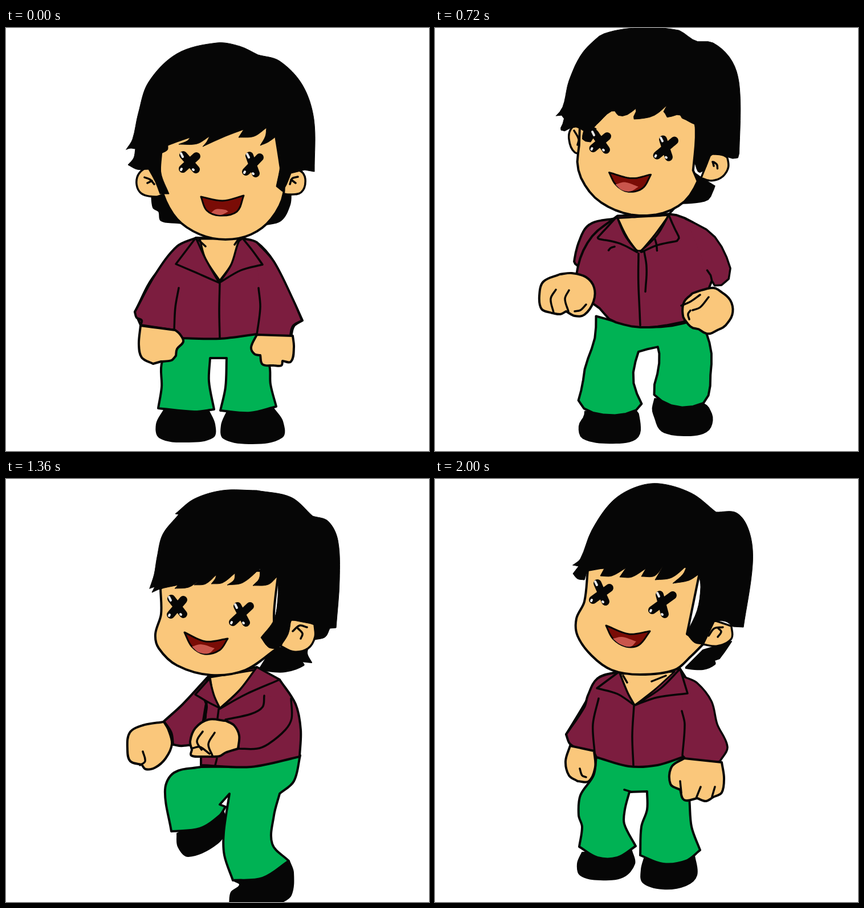
Write an HTML page that moves like this. It is 742x742 px and loops after 2080 ms.

```html
<!DOCTYPE html>
<html lang="en">
<head>
<meta charset="utf-8">
<title>Dancing boy</title>
<style>
html, body { margin: 0; width: 100%; height: 100%; overflow: hidden; background: #fff; }
svg { display: block; width: 100vw; height: 100vh; }
path { stroke: #060606; stroke-linejoin: round; stroke-linecap: round; }
</style>
</head>
<body>
<svg id="stage" viewBox="0 0 742 742"></svg>
<script>
const STEP = 80, FRAMES = 26;
const INK = '#060606', SKIN = '#fac77b', SHIRT = '#7c1d3f', GREEN = '#00b254';

// name, fill, stroke width, closed
const BODY = [
  ['shoes', INK, 2, true], ['pants', GREEN, 4, true], ['armL', SHIRT, 4, true],
  ['torso', SHIRT, 4, true], ['armR', SHIRT, 3.5, false], ['neck', SKIN, 3, true],
  ['collar', SHIRT, 3.5, true], ['creases', 'none', 3.5, false],
  ['hands', SKIN, 4, true], ['knuckles', 'none', 3.5, false]
];
const HEAD = [
  ['backHair', INK, 2, true], ['ears', SKIN, 3.5, true], ['earLines', 'none', 3.5, false],
  ['face', SKIN, 4, true], ['hair', INK, 1, true], ['eyes', 'none', 14, false],
  ['mouth', '#7a0c06', 3, true], ['tongue', '#c9554c', 0, true], ['shine', 'none', 4, false]
];
const LAYERS = [...BODY, ...HEAD];

// One line per layer. "!" marks a sharp point, "/" starts a new outline.
const front = `255,285! 500,285! 498,310 482,338 450,346! 380,350 300,342! 272,338 268,322 258,315
490,252! 485,290! 495,292 518,288 525,265 515,250/268,250! 248,244 230,262 235,288 262,296 280,290!
512,261 502,264 498,274/500,266 508,272/243,262 253,266 260,274/248,272 256,268
285,185! 272,220! 270,250 275,290 300,335 340,362 385,371 430,362 465,335 487,290 481,240 470,170!
211,213! 222,195 232,150 250,95 300,45 370,26 410,32 442,47! 480,58 520,100 540,160 541,252! 524,249! 500,255! 492,275 485,287! 474,278! 481,240 478,208 474,190! 460,200 446,206! 455,190 457,175! 435,190 408,192! 417,178! 385,190 345,208! 352,200 357,190! 335,203 303,204! 318,198 323,192! 300,200 284,206! 283,214 272,220! 272,255 286,291! 270,291! 262,270 250,248! 230,248 214,240! 224,228 227,212! 218,211
311,223 333,248/334,225 310,247/427,224 438,255/445,227 421,252
342,296! 380,303 417,294! 405,322 375,329 352,320
360,324! 368,318 385,319 390,322! 376,328`;

const side = `440,305! 460,310 505,295! 498,318 506,335! 488,333! 492,340 460,351 430,350 415,345!
470,260! 460,280 452,306! 475,316 500,310 512,290 511,268! 490,260
498,273 485,270 473,280/482,275 490,284 487,293
241,205! 242,250 232,285 238,310 270,340 330,357 390,348 443,312! 440,250 448,175! 300,170!
222,205! 230,180 235,150 245,110 273,75! 267,74! 300,48 350,33 410,33! 470,45 508,78! 535,87 552,120 555,190 549,274! 538,275! 530,290 512,295! 511,268! 490,264 470,260! 465,285 452,306! 442,311! 430,308 417,291! 440,260 447,220 447,183! 430,198 403,200! 414,188 416,170! 385,195 358,199! 370,190 372,178! 350,195 330,197! 337,188 339,181! 320,197 300,199! 308,192! 290,203 266,205! 272,199! 240,206 226,212! 231,202!
260,223 281,250/281,225 259,251/376,236 391,265/398,236 368,264
283,282! 320,298 359,293! 345,313 318,320 296,307
296,307! 312,303 336,310! 325,319 308,317`;

const sideLow = `440,275! 460,270 500,262! 494,280 495,296! 485,298! 486,310 460,323 430,320!
472,233! 458,277! 490,275 507,255 503,236!
489,240 475,245 464,256/478,246 485,250 483,258
237,190! 236,215 240,250 235,280 245,308 280,340 340,354 400,345 440,315 458,277! 430,265! 437,150! 300,150!
208,187! 217,175 225,120 245,70 290,27 350,14 400,23 436,46! 465,40 500,65 519,120 524,234! 500,237 471,233! 468,255 460,276! 445,275 428,264! 438,220 435,175 427,158! 410,175 386,183! 402,165 406,145! 385,175 354,184! 362,170 363,158! 345,180 328,184! 335,168! 315,185 291,191! 301,174! 285,190 256,195! 265,185! 235,192 235,208! 222,210 213,205! 221,195 219,185!
260,222 281,249/281,226 259,250/375,216 390,245/398,216 368,246
288,281! 330,289 364,275! 352,302 325,310 302,300
302,300! 318,295 343,299! 330,309 315,308`;

const frontTilt = `250,215! 490,270! 487,290 470,306 440,308! 330,300! 285,280! 258,250
495,220! 475,262! 490,270 515,260 523,235 515,222/255,172! 240,175 235,195 245,218 265,220!
488,247 500,236 514,240/500,236 508,247/244,180 252,195 250,205
278,120! 265,180 268,230 290,275 330,308 378,319 430,308 460,280 475,250! 482,190 475,140! 400,110!
217,133! 232,115 245,75 275,25 310,-4! 455,-4! 475,12! 510,22 545,70 551,120 543,234! 525,235! 522,224 498,220! 480,250! 465,246! 478,220 481,180 474,148! 460,158 434,166! 445,150 449,137! 430,143 398,146! 411,134! 385,145 336,150! 346,134! 325,141 308,138! 312,131! 290,132 275,138! 266,170 267,220! 256,215! 258,190 252,172! 232,170 215,162! 230,150 232,133!
300,160 319,190/323,166 296,184/425,187 430,220/442,191 411,213
323,238! 360,250 395,250! 375,273 350,276 332,262
331,261! 348,258 371,270! 355,276 340,272`;

const sideTilt = `440,330! 470,300! 520,285! 510,300 499,315! 490,318! 491,325 470,334 440,332
490,248! 470,290! 495,293 520,280 520,258!
505,260 490,262 480,275/497,262 502,268 496,277
268,160! 262,215 248,245 250,275 275,310 310,335 360,343 420,335 450,310 470,290! 442,272! 465,160! 380,140!
242,151! 255,140 275,90 310,40 350,15 393,8 450,25 493,58! 530,60 552,95 557,150 541,260! 523,259! 510,250 490,248! 478,270 470,290! 455,287 441,271! 460,230 466,190 463,167! 445,178 417,183! 435,167 442,152! 415,173 386,177! 400,153! 385,170 362,171! 370,157! 345,172 324,172! 335,156! 310,170 290,170! 297,157! 270,160 262,177! 250,175 242,166! 252,153!
285,183 299,215/306,191 277,212/394,203 403,237/417,204 381,230
300,257! 340,272 377,267! 358,291 335,294 312,280
312,280! 328,277 353,285! 343,294 325,290`;

const shift = (text, dx, dy) =>
  text.replace(/(-?\d+),(-?\d+)/g, (_, x, y) => `${+x + dx},${+y + dy}`);

const poses = [
  { at: 0, head: front, body: `277,670! 355,670! 366,695 363,718 318,726 270,719 264,695/388,672! 470,668! 485,690 484,718 430,729 382,720 378,697
305,542! 274,585 273,630 267,667! 330,673 365,669! 356,620 358,579! 387,579! 385,630 376,671! 428,675 474,664! 464,625 462,592 440,536!
333,369! 262,432 226,498! 236,521! 296,530! 303,456!
333,368! 300,383 262,432 226,498! 229,508 238,513 236,521! 296,530! 308,544! 375,545 440,537! 500,542! 505,523 520,513! 505,480 470,410 440,376 415,369!
443,456! 446,490 440,538! 498,543! 503,523 519,513! 505,480 470,410 440,376
340,370! 350,405 375,443! 398,410 410,370!
333,368! 298,414! 340,432 374,447! 350,405/415,369! 432,390 450,415! 412,425 374,447! 395,415 408,375
375,448 374,495 375,544/303,456 297,490 295,529/338,372 350,383/408,370 401,380
440,538! 430,560 436,572 446,574! 450,590 470,592! 483,592 485,584! 500,585 505,560 503,540!/236,522! 233,555 238,578 258,589! 272,585! 290,583 298,575! 300,563 311,550 305,537 297,530!
` },
  { at: 4, head: side, body: `245,610! 330,585! 349,592 345,615 325,640 300,665 265,672 237,655 240,632 248,618/393,680! 482,678! 489,700 480,728 430,733 387,725 386,700 394,690
302,502! 318,510! 280,508 250,520 239,550 237,603! 280,613 315,603 343,582! 335,572 342,562 356,557! 386,564! 385,620 382,679! 430,684 487,674! 470,600 466,560 469,508!
318,362! 270,390 234,432! 260,440 266,470 250,511! 280,500 300,455 312,410! 340,380!
318,358! 300,380 312,412! 312,450 303,502! 340,512 400,515 471,510! 480,480 495,430 492,385 470,360 415,345!
447,421! 415,428 385,448! 400,500! 440,500 465,497 480,470 494,425
318,355! 328,385 347,406! 380,380 405,350!
316,360! 295,388! 325,393 347,406! 330,385/414,345! 421,380! 380,390 347,406! 380,378
347,407 345,440 343,470/437,404 442,420/320,360 330,371/320,545 333,570
384,452! 345,465 334,490 338,522 350,528! 355,538 375,535 383,533! 400,542 415,535 423,514! 440,505 444,485 435,465 410,456/236,432! 215,430 200,437! 180,440 165,460 160,490 175,508 192,509! 205,512 213,507! 215,518 235,515 250,508 264,485 264,455 255,438
347,502 345,525 360,535/380,508 375,520 385,535/187,461 178,480 190,508/215,462 203,485 213,507/238,470 233,495 222,505` },
  { at: 7, head: sideLow, body: `258,680! 350,668! 356,700 350,730 305,736 250,728 245,705 258,690/365,660! 448,665! 460,690 452,712 410,717 362,708 358,685
275,516! 273,555 250,600 252,640 257,681! 300,684 330,679 354,662! 340,635 335,612 346,575! 365,578 386,573! 365,610 360,661! 410,668 452,662! 447,620 458,570 449,513! 400,530 330,530
310,349! 275,355 266,380 274,411! 300,395!
310,349! 285,388! 270,430 270,480 275,517! 320,530 390,531 449,514! 452,480 453,470! 470,420! 460,360! 405,338!
443,405 452,430 455,470! 458,485 475,502! 505,497 522,484! 524,462 500,400 470,365 410,340
306,352! 320,385 335,410! 365,380 395,345!
308,352! 268,384! 305,393 335,410! 318,385/392,346! 405,365 421,384! 375,395 335,410! 368,383
334,410 335,460 347,528/443,405 451,425 455,465/312,353 325,366/390,350 382,358
473,503! 455,520 455,550 470,560! 487,568 500,560! 515,555 528,525 517,490!
455,540 461,537` },
  { at: 11, head: frontTilt, body: `268,665! 360,670! 361,705 322,720 270,712 261,690/406,640! 505,655! 513,680 500,705 460,713 425,703 418,680 404,660
290,495! 288,530 270,615 249,649! 290,670 330,675 375,667! 360,620 366,551! 405,544! 420,580 404,621! 430,655 470,663 519,637! 515,580 500,535 482,508! 380,517
328,318! 265,335 238,380 219,430! 280,455! 292,400!
330,310! 270,335 240,375 219,430! 250,430 282,460! 290,497! 340,517 420,516 482,505! 510,445! 518,410 505,365 470,330 428,312!
512,445 518,410 505,365 470,330
335,315! 355,350 380,380! 405,345 425,312!
330,310! 298,355! 340,362 380,380! 350,345/428,310! 438,361! 405,367 380,380! 410,345
380,381 378,450 373,515/291,380 290,420 283,460/460,388 459,400 454,415/219,430 230,418 248,409/422,314 410,327
430,428! 416,445 418,475 430,485! 440,495 452,495! 470,505 490,500 515,475 517,455 505,437 480,430! 470,418 445,422/219,432! 190,445 183,470 187,493 205,500! 220,502 230,497! 245,505 262,503 278,480 279,455 265,437 240,430
441,451 430,465 431,485/465,468 448,480 432,487/480,472 465,490 452,495/212,459 203,475 208,499/235,460 228,475 234,497/265,485 255,495 245,497` },
  { at: 17, head: shift(side, 30, -13), body: `300,622! 380,578! 388,610 370,640 320,662 302,645/400,705! 497,670! 504,690 500,730 480,745! 392,745! 395,725 410,712
342,505! 295,515 279,545 290,618! 340,613 375,590 385,575! 375,571! 392,552! 382,620 383,660 398,704! 450,700 496,670! 467,640 470,590 480,552! 505,530 516,485! 420,503
355,346! 310,395 277,425! 290,445 293,466! 310,468 335,460 352,390!
355,347! 345,380! 352,400 343,440 342,502! 430,505 515,487! 517,440 508,395 480,352! 440,330!
453,380 450,400 430,412 385,422! 405,440 408,473! 440,473 460,465 490,440 501,420 500,385
358,348! 365,385 375,402! 410,370 437,335!
357,350! 332,378! 352,390 375,402! 365,380/440,330! 480,352! 420,378 375,403! 410,370
373,404 371,420/370,490 367,502/352,392 350,420
385,424! 355,422 332,437 323,460 326,475! 325,485 345,487! 360,487 375,486 385,480 407,473! 409,450 400,432/277,426! 240,432 217,445 213,475 218,495 238,501! 245,509 262,506 280,490 291,465 285,440
345,443 335,460 343,475/366,445 355,465 362,485/328,472 340,470 357,482/240,478 244,495 235,502` },
  { at: 22, head: shift(side, 8, -7), body: `270,592! 335,558! 346,580 330,605 298,627 275,615/380,690! 450,650! 465,655 480,695 470,720 455,745! 378,745! 372,725
300,483! 265,490 254,510 251,573! 280,587 310,585 333,560! 346,564! 342,620 352,660 372,688! 420,690 453,637! 430,622 428,590 434,560! 475,545 493,510 493,484! 400,497
330,350! 300,385 250,412! 263,430 266,450! 280,450 290,458 325,440 330,390!
336,350! 320,375! 328,395 327,460! 380,497! 430,502 493,484! 495,440 475,390 440,350 420,338!
392,390 385,410 355,440 315,473! 350,475 380,500! 410,497 428,485 435,450 449,420 448,390 435,365
338,350! 342,380 350,400! 380,370 405,345!
335,352! 306,380! 328,388 350,401! 340,375/420,337! 420,378! 385,385 350,401! 385,367
349,403 347,440/433,562 436,548
315,474! 290,490 287,515 300,540! 308,553 335,550! 355,548 367,530 378,515 378,490 355,477/250,415! 215,418 198,440 200,458 208,462! 210,475 225,477 245,470 266,448! 262,428
305,512 303,530 315,543/333,525 333,540 345,547/362,520 368,530/217,450 215,458 208,462/305,543 320,541 340,550` },
  { at: 25, head: sideTilt, body: `258,655! 345,652! 350,675 330,698 290,703 255,695 250,675/368,662! 455,660! 459,695 440,713 400,719 365,708 362,685
283,487! 278,520 255,555 252,590 258,610 253,645! 285,664 320,664 352,644! 332,605 333,580 341,549! 372,548! 372,580 362,610 360,660! 400,675 440,670 465,651! 450,610 446,560 437,486! 360,503
322,338! 285,350 265,390 230,448! 238,465 258,475 278,477! 290,470! 300,390!
322,338! 285,350 268,380 262,400 230,448! 237,465 255,474 278,477! 283,488! 340,504 390,502 437,487! 460,490! 460,380! 430,333!
433,407 438,430 434,485! 445,495 480,502 500,495! 513,470 495,430 485,390 460,358 437,347
325,342! 335,370 350,397! 385,370 420,338!
323,338! 284,367! 320,377 350,397! 338,375/430,333! 443,376! 390,383 350,397! 395,368
349,398 346,450 348,502/287,385 277,430 280,480/330,345 337,357/405,345 380,355/332,545 345,549
437,490! 415,505 413,535 430,545! 437,563 460,560! 475,565 488,558! 503,550 507,525 503,497!/237,468! 229,495 235,520 250,530! 270,530 281,505 279,477!
430,530 432,550/466,540 458,560/491,540 486,557/254,508 258,520 265,523` }
];

const svg = document.getElementById('stage');
const newPath = () => document.createElementNS('http://www.w3.org/2000/svg', 'path');
const probe = newPath();

const parse = text => text.split(' ').map(t => {
  const [x, y] = t.split(',').map(parseFloat);
  return { x, y, sharp: t.endsWith('!') };
});

// Smooth curve through the points, breaking at sharp ones.
function curve(text, closed) {
  const pts = parse(text), n = pts.length;
  const get = i => closed ? pts[(i + n) % n] : pts[Math.max(0, Math.min(n - 1, i))];
  const handle = (i, dir) => {
    const p = get(i), q = get(i + dir), r = get(i - dir);
    if (p.sharp) return `${p.x + (q.x - p.x) / 3},${p.y + (q.y - p.y) / 3}`;
    const len = Math.hypot(q.x - p.x, q.y - p.y) / 3;
    const span = Math.hypot(q.x - r.x, q.y - r.y) || 1;
    return `${p.x + (q.x - r.x) / span * len},${p.y + (q.y - r.y) / span * len}`;
  };
  let d = `M${pts[0].x},${pts[0].y}`;
  for (let i = 0; i < (closed ? n : n - 1); i++) {
    const end = get(i + 1);
    d += `C${handle(i, 1)} ${handle(i + 1, -1)} ${end.x},${end.y}`;
  }
  return d + (closed ? 'Z' : '');
}

function sample(d, count) {
  probe.setAttribute('d', d);
  const len = probe.getTotalLength();
  return Array.from({ length: count + 1 }, (_, i) => probe.getPointAtLength(len * i / count));
}

// Small highlights on three lobes of each eye.
function shine(eyes) {
  const e = eyes.split('/').map(parse);
  return [0, 2].flatMap(i => {
    const [tl, br] = e[i], bl = e[i + 1][1];
    return [`${tl.x - 4},${tl.y - 3} ${tl.x - 1},${tl.y + 3}`,
      `${bl.x - 3},${bl.y + 2} ${bl.x - 2},${bl.y}`,
      `${br.x - 5},${br.y} ${br.x - 4},${br.y + 1}`];
  }).join('/');
}

for (const pose of poses) {
  const lines = [...pose.body.split('\n'), ...pose.head.split('\n')];
  lines.push(shine(lines[BODY.length + 5]));
  pose.parts = lines.map((line, k) => {
    const [name, , , closed] = LAYERS[k];
    return line.split('/').filter(Boolean).map(text => {
      const d = curve(text, closed);
      const count = name === 'hair' ? 140 : closed ? 50 : 12;
      return { d, pts: sample(d, count) };
    });
  });
}

function blend(a, b, t, lift) {
  return (t < 0.5 ? a : b).map((near, i) => {
    if (!a[i] || !b[i]) return near.d;
    const to = b[i].pts;
    return 'M' + a[i].pts.map((p, j) =>
      `${(p.x + (to[j].x - p.x) * t).toFixed(1)},${(p.y + (to[j].y - p.y) * t - lift).toFixed(1)}`).join('L');
  }).join('');
}

const frames = Array.from({ length: FRAMES }, (_, f) => {
  const i = poses.findLastIndex(p => p.at <= f);
  const a = poses[i], b = poses[(i + 1) % poses.length];
  if (a.at === f) return a.parts.map(part => part.map(s => s.d).join(''));
  let t = (f - a.at) / (b.at - a.at);
  const lift = 6 * Math.sin(Math.PI * t);
  if (b.at - a.at > 5) t = 1 - (1 - t) ** 2;
  return a.parts.map((part, k) => blend(part, b.parts[k], t, k < BODY.length ? 0 : lift));
});

const paths = LAYERS.map(([name, fill, width]) => {
  const p = newPath();
  p.setAttribute('fill', fill);
  p.setAttribute('stroke-width', width);
  if (name === 'shine') p.style.stroke = '#e8e8e8';
  if (!width) p.style.stroke = 'none';
  return svg.appendChild(p);
});

let shown = -1;
function draw() {
  const f = Math.floor(performance.now() / STEP) % FRAMES;
  if (f !== shown) {
    shown = f;
    paths.forEach((p, k) => p.setAttribute('d', frames[f][k]));
  }
  requestAnimationFrame(draw);
}
draw();
</script>
</body>
</html>
```
